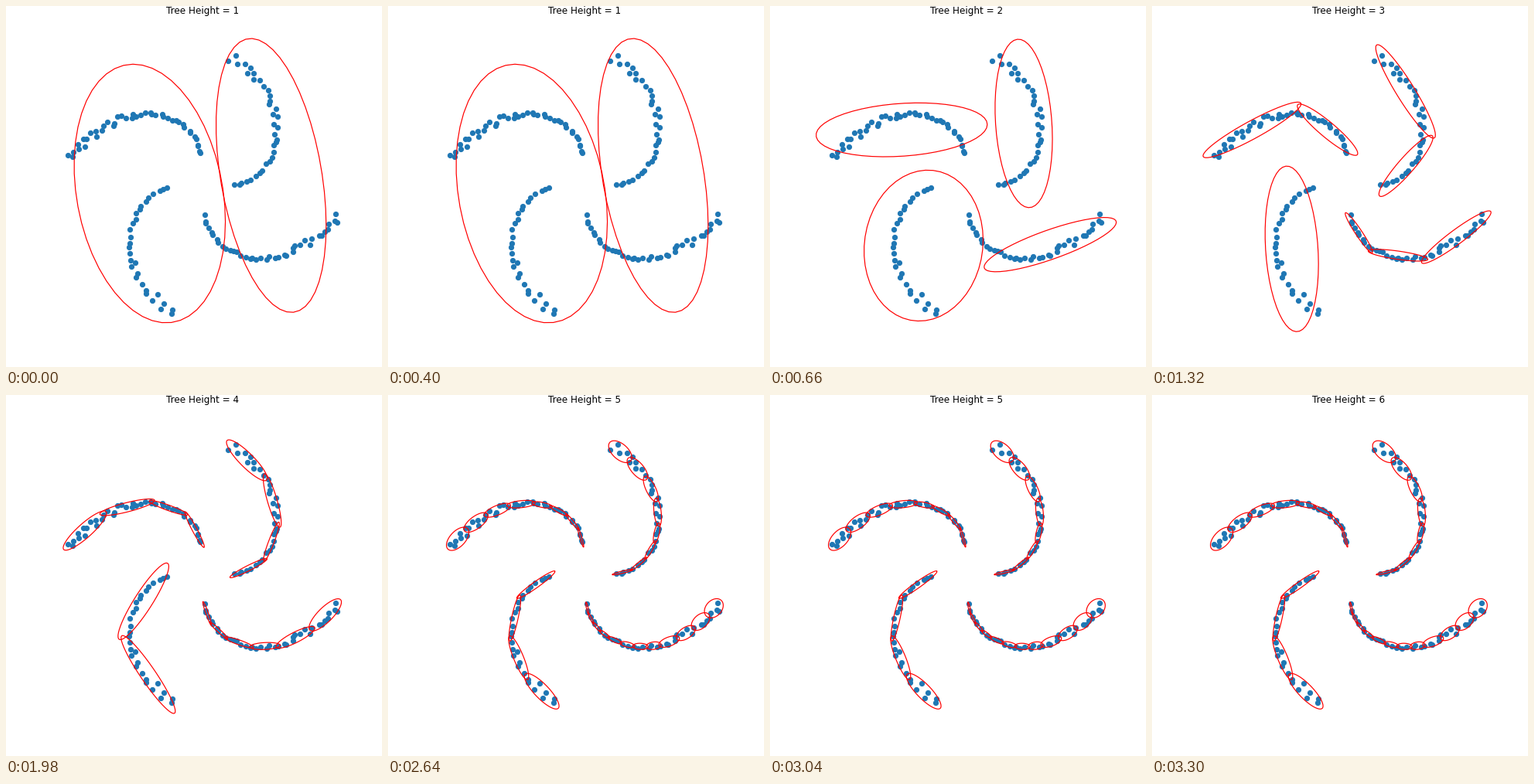
Recreate the animation shown at these times as a matplotlib script. Size 486 by 467 pixels, loop 3960 ms.

```python
import numpy as np
import matplotlib.pyplot as plt
from matplotlib.animation import FuncAnimation
from matplotlib.collections import LineCollection

W, H, DPI = 486, 467, 72
FRAMES, INTERVAL = 6, 660
STEP = 0.25  # arc length between samples of an arm
rng = np.random.default_rng(4)

# Each arm: key points from the inner to the outer end, and its dot count
TOP_LEFT = [(252, 195), (234, 159), (196, 140), (150, 147), (110, 167),
            (80, 198)], 43
TOP_RIGHT = [(292, 231), (331, 213), (348, 178), (349, 147), (330, 104),
             (289, 63)], 35
BOTTOM_LEFT = [(215, 234), (180, 253), (166, 280), (161, 310), (170, 345),
               (193, 377), (218, 402)], 30
BOTTOM_RIGHT = [(257, 269), (271, 301), (300, 320), (337, 325), (370, 317),
                (400, 297), (430, 267)], 40
ARMS = (TOP_LEFT, TOP_RIGHT, BOTTOM_LEFT, BOTTOM_RIGHT)


def arc_length(path):
    steps = np.hypot(*np.diff(path, axis=0).T)
    return np.concatenate([[0], np.cumsum(steps)])


def curve(keys):
    """Smooth path near the key points, sampled evenly by arc length."""
    keys = np.array(keys, float)
    s = arc_length(keys) / arc_length(keys)[-1]
    t = np.linspace(0, 1, 600)
    path = np.column_stack([np.polyval(np.polyfit(s, k, 4), t) for k in keys.T])
    length = arc_length(path)
    even = np.arange(0, length[-1], STEP)
    return np.column_stack([np.interp(even, length, p) for p in path.T])


def spread(path):
    """Offset vectors across the path; the arm widens outwards."""
    dx, dy = np.gradient(path, axis=0).T / STEP
    width = 1 + 10 * np.linspace(0, 1, len(path)) ** 1.5
    return np.column_stack([-dy, dx]) * width[:, None]


def band(arm):
    """Two tracks either side of the path, one pair per sample."""
    path = curve(arm[0])
    half = spread(path) / 2
    return np.stack([path - half, path + half], axis=1)


def dots(arm):
    path, n = curve(arm[0]), arm[1]
    u = (np.arange(n) + rng.random(n)) / n
    i = (u * len(path)).astype(int)
    return path[i] + spread(path)[i] * rng.uniform(-0.8, 0.8, (n, 1))


def cut(arm, *fractions):
    b = band(arm)
    return np.split(b, [int(f * len(b)) for f in fractions])


def merge(parts):
    return [np.concatenate(p) for p in zip(parts[::2], parts[1::2])]


def halve(parts):
    return [h for p in parts for h in np.array_split(p, 2)]


def ellipse(part):
    """Two standard deviations around the mean of the part."""
    xy = part.reshape(-1, 2)
    t = np.linspace(0, 2 * np.pi, 50)
    circle = np.column_stack([np.cos(t), np.sin(t)])
    return xy.mean(0) + 2 * circle @ np.linalg.cholesky(np.cov(xy.T)).T


# Binary tree over the arms: merge towards the root, halve towards the leaves
br_in, *br_rest = cut(BOTTOM_RIGHT, 0.25, 0.56)
third = [*cut(TOP_LEFT, 0.42), band(BOTTOM_LEFT), br_in,
         *cut(TOP_RIGHT, 0.43), *br_rest]
second, fourth = merge(third), halve(third)
levels = [[ellipse(p) for p in parts]
          for parts in (merge(second), second, third, fourth, halve(fourth))]

# The small margin keeps the pixel size from being rounded down
fig = plt.figure(figsize=((W + 0.01) / DPI, (H + 0.01) / DPI), dpi=DPI,
                 facecolor="white")
ax = fig.add_axes([0, 0, 1, 1])
ax.set(xlim=(0.5, W + 0.5), ylim=(H, 0))
ax.axis("off")

x, y = np.concatenate([dots(arm) for arm in ARMS]).T
ax.plot(x, y, "o", color="#1f77b4", ms=6.2, mew=1)
outlines = ax.add_collection(
    LineCollection([], colors="red", linewidths=1.2, zorder=3))
title = ax.text(254.5, 9.9, "", ha="center", va="baseline", fontsize=12,
                family="DejaVu Sans", color="black")


def update(i):
    # The last level has nothing left to split, so its ellipses stay
    outlines.set_segments(levels[min(i, len(levels) - 1)])
    title.set_text(f"Tree Height = {i + 1}")
    return outlines, title


anim = FuncAnimation(fig, update, frames=FRAMES, interval=INTERVAL,
                     repeat=True, repeat_delay=0, blit=False)
plt.show()
```
